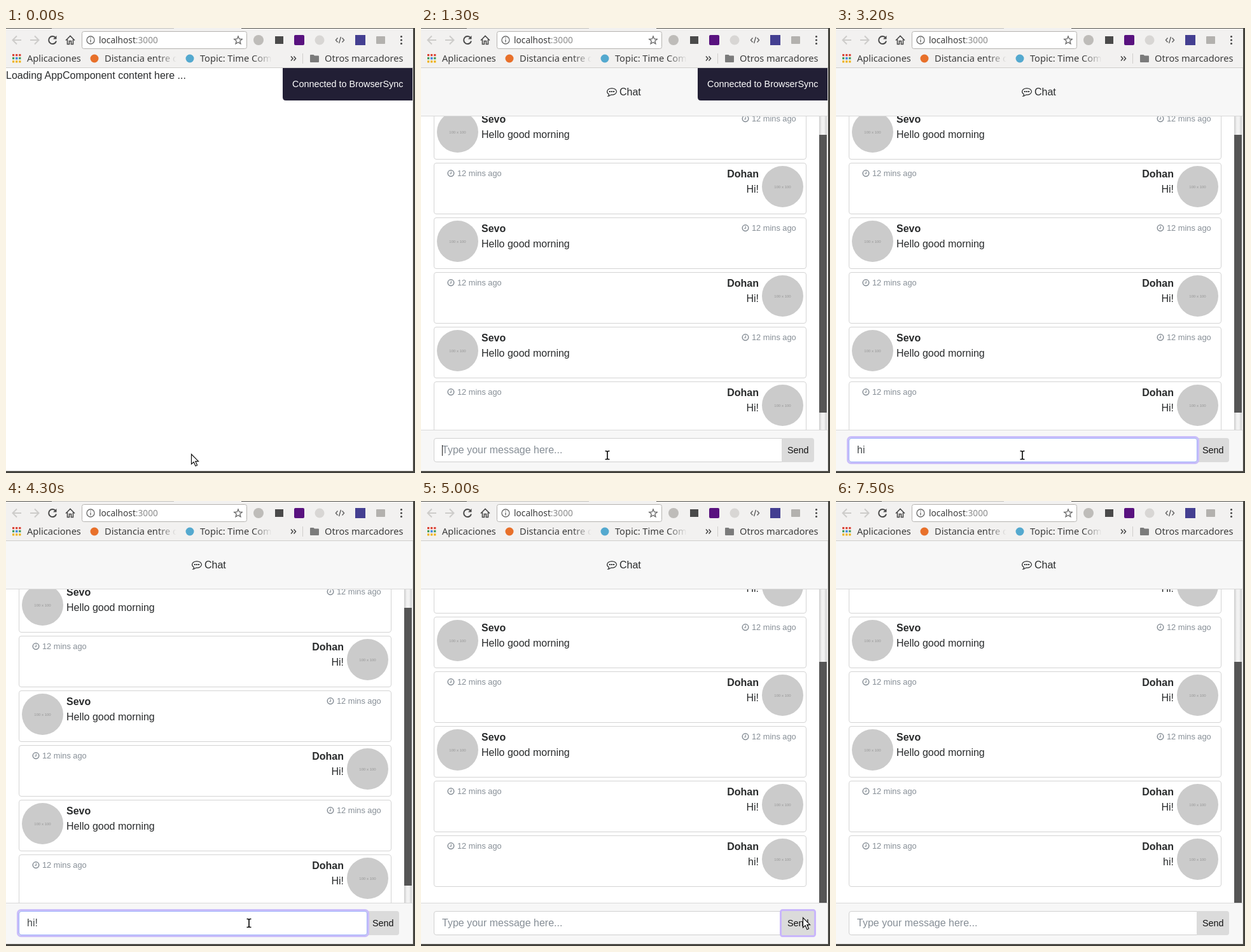
These frames come from a looping animation (643 by 700 pixels, 7600 ms). An HTML page:

```html
<!DOCTYPE html>
<html lang="en">
<head>
<meta charset="utf-8">
<title>Chat</title>
<style>
html, body { margin: 0; width: 100%; height: 100%; overflow: hidden; background: #fff; }
svg { display: block; width: 100%; height: 100%; font: 16px "Liberation Sans", Arial, sans-serif; fill: #292b2c; }
text { white-space: pre; }
.bar { font: 14.6px "Noto Sans", "Open Sans", sans-serif; fill: #3c3c3c; }
.line { fill: none; stroke: #4a4a4a; stroke-width: 2; }
.name { font-weight: bold; }
.ago { font-size: 12.8px; fill: #868e96; }
.tiny { font-size: 6px; fill: #969696; text-anchor: middle; }
.end { text-anchor: end; }
.typed { fill: #464a4c; }
.hint { fill: #868e96; }

.anim { animation: 7.6s step-end infinite; }
.loading { animation-name: loading; }
.chat { animation-name: chat; }
.toast { animation-name: toast; }
.list { animation-name: list; }
.thumb { animation-name: thumb; }
.hint { animation-name: hint; }
.h { animation-name: h; }
.hi { animation-name: hi; }
.bang { animation-name: bang; }
.caret { animation-name: caret; }
.glow-under { animation-name: glow-under; }
.glow-over { animation-name: glow-over; }
.pressed { animation-name: pressed; }
.arrow { animation-name: arrow; }
.beam { animation-name: beam; }

@keyframes loading { 0% { opacity: 1 } 1.315%, 100% { opacity: 0 } }
@keyframes chat { 0% { opacity: 0 } 1.315%, 100% { opacity: 1 } }
@keyframes toast { 0% { opacity: 1 } 22.368%, 100% { opacity: 0 } }
@keyframes list { 0% { transform: none } 65.789%, 100% { transform: translateY(-116px) } }
@keyframes thumb {
  0% { transform: translateY(168px); height: 437px }
  65.789%, 100% { transform: translateY(253px); height: 379px }
}
@keyframes hint { 0% { opacity: 1 } 32.894% { opacity: 0 } 65.789%, 100% { opacity: 1 } }
@keyframes h { 0% { opacity: 0 } 32.894% { opacity: 1 } 34.21%, 100% { opacity: 0 } }
@keyframes hi { 0% { opacity: 0 } 34.21% { opacity: 1 } 48.684%, 100% { opacity: 0 } }
@keyframes bang { 0% { opacity: 0 } 48.684% { opacity: 1 } 65.789%, 100% { opacity: 0 } }
@keyframes caret {
  0% { opacity: 0; transform: none }
  17.105% { opacity: 1; transform: none }
  25% { opacity: 0; transform: none }
  32.894% { opacity: 1; transform: translateX(9px) }
  34.21% { opacity: 1; transform: translateX(12px) }
  42.105% { opacity: 0; transform: translateX(12px) }
  48.684% { opacity: 1; transform: translateX(17px) }
  55.263%, 100% { opacity: 0; transform: translateX(17px) }
}
@keyframes glow-under { 0% { opacity: 0 } 64.473% { opacity: .7 } 65.789%, 100% { opacity: 0 } }
@keyframes glow-over { 0% { opacity: 0 } 18.421% { opacity: .65 } 19.736% { opacity: 1 } 64.473%, 100% { opacity: 0 } }
@keyframes pressed { 0% { opacity: 0 } 65.789% { opacity: 1 } 97.368%, 100% { opacity: 0 } }
@keyframes arrow {
  0% { opacity: 1; transform: translate(291px, 670px) }
  1.315% { opacity: 0; transform: translate(291px, 670px) }
  59.21% { opacity: 1; transform: translate(582px, 640px) }
  60.526% { opacity: 1; transform: translate(632px, 632px) }
  61.842% { opacity: 1; transform: translate(618px, 646px) }
  63.157% { opacity: 1; transform: translate(603px, 655px) }
  64.473% { opacity: 1; transform: translate(600px, 655px) }
  84.21% { opacity: 1; transform: translate(470px, 420px) }
  85.526% { opacity: 1; transform: translate(314px, 202px) }
  97.368%, 100% { opacity: 0; transform: translate(314px, 202px) }
}
@keyframes beam {
  0% { opacity: 0; transform: translate(293px, 672px) }
  1.315% { opacity: 1; transform: translate(293px, 672px) }
  55.263% { opacity: 1; transform: translate(318px, 671px) }
  56.578% { opacity: 1; transform: translate(382px, 664px) }
  57.894% { opacity: 1; transform: translate(470px, 656px) }
  59.21%, 100% { opacity: 0; transform: translate(470px, 656px) }
}
</style>
</head>
<body>
<svg viewBox="0 0 643 700" preserveAspectRatio="none">
  <defs>
    <clipPath id="view"><path d="M0 139H639V632H0z"/></clipPath>
    <linearGradient id="fade1" gradientUnits="userSpaceOnUse" x1="238" x2="268">
      <stop stop-color="#3c3c3c"/><stop offset="1" stop-color="#3c3c3c" stop-opacity="0"/>
    </linearGradient>
    <linearGradient id="fade2" gradientUnits="userSpaceOnUse" x1="388" x2="418">
      <stop stop-color="#3c3c3c"/><stop offset="1" stop-color="#3c3c3c" stop-opacity="0"/>
    </linearGradient>
    <linearGradient id="track">
      <stop stop-color="#ccc"/><stop offset=".35" stop-color="#f2f2f2"/>
      <stop offset=".65" stop-color="#f2f2f2"/><stop offset="1" stop-color="#ccc"/>
    </linearGradient>
    <rect id="frame" x="20.5" y=".5" width="585" height="80" rx="3.5" fill="#fff" stroke="#d4d4d4"/>
    <g id="face">
      <circle r="32.5" fill="#cbcbcb"/>
      <text class="tiny" y="2">100 x 100</text>
    </g>
    <g id="time">
      <circle cx="6" cy="-4.4" r="4.8" fill="none" stroke="#868e96" stroke-width="1.5"/>
      <path d="M6.4 -7.2V-3.8H3.9" fill="none" stroke="#868e96" stroke-width="1.1"/>
      <text class="ago" x="16">12 mins ago</text>
    </g>
    <g id="left">
      <use href="#frame"/>
      <use href="#face" x="57.5" y="37.5"/>
      <text class="name" x="95" y="23">Sevo</text>
      <text x="95" y="47">Hello good morning</text>
      <use href="#time" x="504" y="21"/>
    </g>
    <g id="right">
      <use href="#frame"/>
      <use href="#face" x="568.5" y="37.5"/>
      <text class="name end" x="531" y="23">Dohan</text>
      <use href="#time" x="41" y="21"/>
    </g>
    <g id="reply">
      <use href="#right"/>
      <text class="end" x="531" y="47">Hi!</text>
    </g>
    <g id="glow" fill="none">
      <rect x="18.5" y="643.5" width="551" height="41" rx="5" stroke="#c9bdfa" stroke-width="3"/>
      <rect x="20.5" y="645.5" width="547" height="37" rx="3.5" stroke="#9db3fa"/>
    </g>
  </defs>

  <path d="M0 0H643V700H0z" fill="#fff"/>

  <text class="anim loading" x="0" y="80">Loading AppComponent content here ...</text>

  <g class="anim chat">
    <g clip-path="url(#view)">
      <g class="anim list">
        <use href="#left" y="126"/>
        <use href="#reply" y="212"/>
        <use href="#left" y="298"/>
        <use href="#reply" y="384"/>
        <use href="#left" y="470"/>
        <use href="#reply" y="556"/>
        <use href="#right" y="642"/>
        <text class="end" x="531" y="689">hi!</text>
      </g>
      <path d="M626 139H638V632H626z" fill="url(#track)"/>
      <rect class="anim thumb" x="626" width="12" height="437" fill="#555"/>
    </g>

    <path d="M0 63H639V138H0zM0 633H639V696H0z" fill="#f7f7f7"/>
    <path d="M0 138.5H639M0 632.5H639" stroke="#d9d9d9"/>
    <path d="M295.5 104.2C293 103 292.6 101.500 292.600 100C292.600 97 296 94.800 300 94.800S307.400 97 307.400 100S304 105.200 300 105.200L298.600 105.100C297.300 106.400 295.800 107 294.200 107.200Q295.600 106 295.500 104.200z" fill="none" stroke="#292b2c" stroke-width="1.2"/>
    <path d="M296 100h2m1 0h2m1 0h2" stroke="#292b2c" stroke-width="2"/>
    <text x="312" y="106">Chat</text>

    <path d="M567.5 645.500H24Q20.500 645.500 20.500 649V679Q20.500 682.500 24 682.500H567.500z" fill="#fff" stroke="#d0d0d0"/>
    <use href="#glow" class="anim glow-under"/>
    <path d="M567 645H614Q618 645 618 649V679Q618 683 614 683H567z" fill="#dbdbdb"/>
    <use href="#glow" class="anim glow-over"/>
    <g class="anim pressed">
      <rect x="565.5" y="643.5" width="54" height="41" rx="3" fill="#dbdbdb" stroke="#c9b6fb" stroke-width="3"/>
    </g>
    <text x="576" y="669" font-size="14.4" fill="#111">Send</text>
    <text class="anim hint" x="33" y="669">Type your message here...</text>
    <g class="typed">
      <text class="anim h" x="33" y="669">h</text>
      <text class="anim hi" x="33" y="669">hi</text>
      <text class="anim bang" x="33" y="669">hi!</text>
    </g>
    <path class="anim caret" d="M33 656h1v17h-1z" fill="#222"/>
  </g>

  <g class="anim toast">
    <path d="M435 63H639V114H440Q435 114 435 109z" fill="#221f35"/>
    <text x="450" y="93" font-size="14.4" fill="#fff">Connected to BrowserSync</text>
  </g>

  <!-- browser bars -->
  <path d="M0 0H640V63H0z" fill="#f2f1f0"/>
  <path d="M0 62.5H640" stroke="#cfcecc"/>
  <path d="M0 .5H72M370 .5H643" stroke="#55544f"/>
  <path d="M72 .5H264" stroke="#c4c2bf"/>
  <g class="line">
    <path d="M24 19H11M17 12.500L10.500 19L17 25.500M38 19H51M45 12.500L51.500 19L45 25.500" stroke="#cdccca"/>
    <path d="M78 15.500A6 6 0 1 0 79 20.500"/>
    <path d="M79.500 12V17.500H74z" fill="#4a4a4a" stroke="none"/>
    <path d="M94 19.500L101 12.500L108 19.500M96.500 18V25.500H99.500V20.500H102.500V25.500H105.500V18" stroke-width="1.600"/>
  </g>
  <rect x="119.5" y="5.5" width="259" height="27" rx="3" fill="#fff" stroke="#b5b3b0"/>
  <g fill="none" stroke="#666" stroke-width="1.3">
    <circle cx="133" cy="19" r="6"/>
    <path d="M133 18V22.500M133 15V16.500"/>
    <path d="M365 13L366.700 17.200L371.200 17.500L367.700 20.400L368.900 24.800L365 22.400L361.100 24.800L362.300 20.400L358.800 17.500L363.300 17.200z"/>
  </g>
  <text class="bar" x="146" y="24" style="font-size:13.7px">localhost<tspan fill="#8c8c8c">:3000</tspan></text>

  <circle cx="397" cy="19" r="8" fill="#bebcb9"/>
  <rect x="423" y="13" width="13" height="12" fill="#4a4a4a"/>
  <rect x="453" y="11" width="16" height="16" rx="2" fill="#59127f"/>
  <circle cx="493" cy="19" r="7.500" fill="#d8d6d4"/>
  <path d="M521.500 15.500L518.500 19L521.500 22.500M528.500 15.500L531.500 19L528.500 22.500M526.500 14L523.500 24" fill="none" stroke="#666" stroke-width="1.500"/>
  <rect x="549" y="11" width="16" height="16" fill="#443f91"/>
  <rect x="582" y="13" width="14" height="12" rx="1" fill="#b3b1ae"/>
  <path d="M621.500 13.500h0m0 5.500h0m0 5.500h0" stroke="#4a4a4a" stroke-width="3.200" stroke-linecap="round"/>

  <g stroke-width="3.200" stroke-dasharray="3.200 1.900">
    <path d="M10 42.600h13.400" stroke="#dc4437"/>
    <path d="M10 47.700h13.400" stroke="#3f9b5a"/>
    <path d="M10 52.800h13.400" stroke="#eeb211"/>
    <path d="M15.100 47.700h3.200" stroke="#4285f4"/>
  </g>
  <circle cx="139" cy="48" r="6.500" fill="#e8702a"/>
  <circle cx="289" cy="48" r="6.500" fill="#54a9cf"/>
  <g class="bar">
    <text x="33" y="53">Aplicaciones</text>
    <text x="155" y="53" fill="url(#fade1)">Distancia entre d</text>
    <text x="305" y="53" fill="url(#fade2)">Topic: Time Comp</text>
    <text x="501" y="53">Otros marcadores</text>
  </g>
  <path d="M448 44.500L451 48L448 51.500M452.500 44.500L455.500 48L452.500 51.500" fill="none" stroke="#4a4a4a" stroke-width="1.600"/>
  <path d="M466.500 40V56" stroke="#d0cecb"/>
  <path d="M478 43Q478 42 479 42H483.500L485 43.500H491Q492 43.500 492 44.500V53Q492 54 491 54H479Q478 54 478 53z" fill="#7b7b7b"/>

  <path d="M639 63H640V697H0V696H639z" fill="#e4e3e1"/>
  <path d="M640 0H643V700H0V697H640z" fill="#43423d"/>

  <path class="anim arrow" d="M.5 .5V16L4.200 12.700L7 19L9.600 17.800L6.900 11.700H11.500z" fill="#fff" stroke="#111" stroke-width="1.200"/>
  <g class="anim beam" fill="none">
    <path d="M-3.500 -6.500H-1.500L0 -5.500L1.500 -6.500H3.500M0 -5.500V5.500M-3.500 6.500H-1.500L0 5.500L1.500 6.500H3.500" stroke="#fff" stroke-width="3.500"/>
    <path d="M-3.500 -6.500H-1.500L0 -5.500L1.500 -6.500H3.500M0 -5.500V5.500M-3.500 6.500H-1.500L0 5.500L1.500 6.500H3.500" stroke="#111" stroke-width="1.700"/>
  </g>
</svg>
</body>
</html>
```
